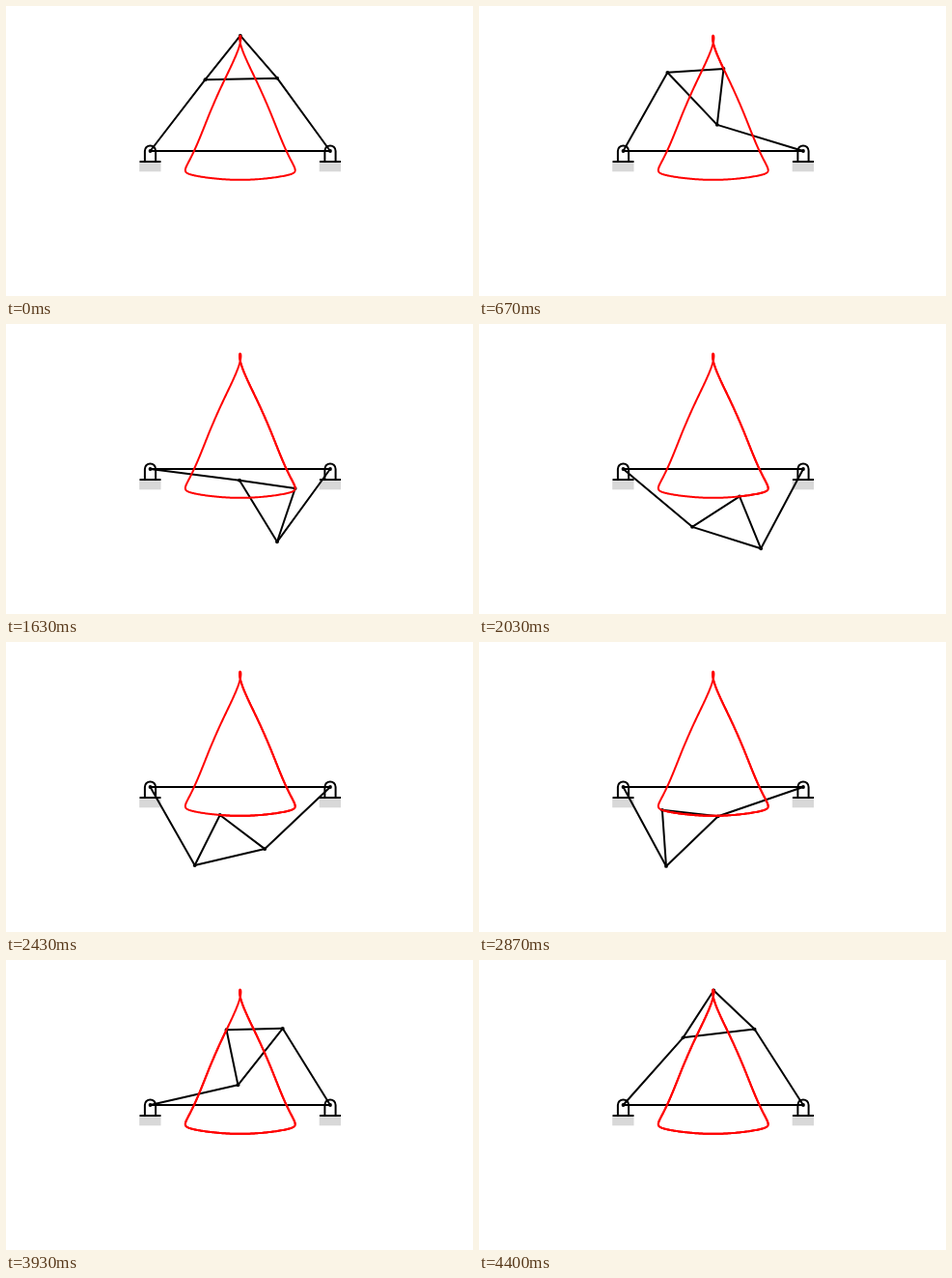
Recreate the animation shown at these times as an HTML page with a canvas. Size 484 px wide and 300 px high, loop 4.43 s.

```html
<!DOCTYPE html>
<html lang="en">
<head>
<meta charset="utf-8">
<title>Four-bar linkage</title>
<style>
  html, body { margin: 0; width: 100%; height: 100%; overflow: hidden; background: #fff; }
  canvas { display: block; }
</style>
</head>
<body>
<canvas id="stage" width="484" height="300"></canvas>
<script>
const ctx = document.getElementById('stage').getContext('2d');
const LOOP = 4430;
const RAD = Math.PI / 180;
const A = [149.5, 150], B = [336, 150];
const ground = B[0] - A[0];
const rocker = ground * 0.5, coupler = ground * 0.4, apex = ground * 0.24;
// The left rocker turns back where the coupler and right rocker line up.
const swing = Math.acos(0.44);
const startPhase = 55, phaseStep = 2.683;

function pose(phase) {
  const angle = swing * Math.sin(phase * RAD);
  const C = [A[0] + rocker * Math.cos(angle), A[1] - rocker * Math.sin(angle)];
  const dx = B[0] - C[0], dy = B[1] - C[1];
  const dist = Math.hypot(dx, dy);
  const cosine = (dist * dist + rocker * rocker - coupler * coupler) / (2 * dist * rocker);
  const elbow = Math.acos(Math.min(1, cosine)) * Math.sign(Math.cos(phase * RAD));
  const right = Math.atan2(dy, dx) + elbow;
  const D = [B[0] - rocker * Math.cos(right), B[1] - rocker * Math.sin(right)];
  const k = apex / coupler;
  const P = [
    (C[0] + D[0]) / 2 + k * (D[1] - C[1]),
    (C[1] + D[1]) / 2 - k * (D[0] - C[0])
  ];
  return { C, D, P };
}

function line(points, color = '#000') {
  ctx.strokeStyle = color;
  ctx.beginPath();
  points.forEach(p => ctx.lineTo(...p));
  ctx.stroke();
}

function dot([x, y]) {
  ctx.fillStyle = '#000';
  ctx.beginPath();
  ctx.arc(x, y, 1.9, 0, 7);
  ctx.fill();
}

function anchor([x, y]) {
  ctx.fillStyle = '#d8d8d8';
  ctx.fillRect(x - 11.3, y + 11, 22.3, 10.3);
  ctx.strokeStyle = '#000';
  ctx.beginPath();
  ctx.moveTo(x - 5.6, y + 11);
  ctx.arc(x, y, 5.6, Math.PI, 0);
  ctx.lineTo(x + 5.6, y + 11);
  ctx.stroke();
  line([[x - 11, y + 11], [x + 11, y + 11]]);
}

function trace(from, to) {
  const points = [];
  for (let phase = from; phase < to; phase++) points.push(pose(phase).P);
  points.push(pose(to).P);
  line(points, '#f00');
}

function draw(now) {
  const t = now % LOOP, rest = t % 100;
  const step = 3 * Math.floor(t / 100) + (rest >= 30) + (rest >= 70);
  const phase = startPhase + phaseStep * step;
  const { C, D, P } = pose(phase);

  ctx.fillStyle = '#fff';
  ctx.fillRect(0, 0, 484, 300);
  ctx.lineWidth = 2;
  ctx.lineJoin = 'round';
  [A, B].forEach(anchor);
  line([A, B]);
  line([A, C, D, B]);
  line([C, P, D]);
  [A, B, C, D, P].forEach(dot);
  trace(startPhase, startPhase + 360);
  trace(startPhase, phase);
}

const began = performance.now();
function tick() {
  draw(performance.now() - began);
  requestAnimationFrame(tick);
}
tick();
</script>
</body>
</html>
```
